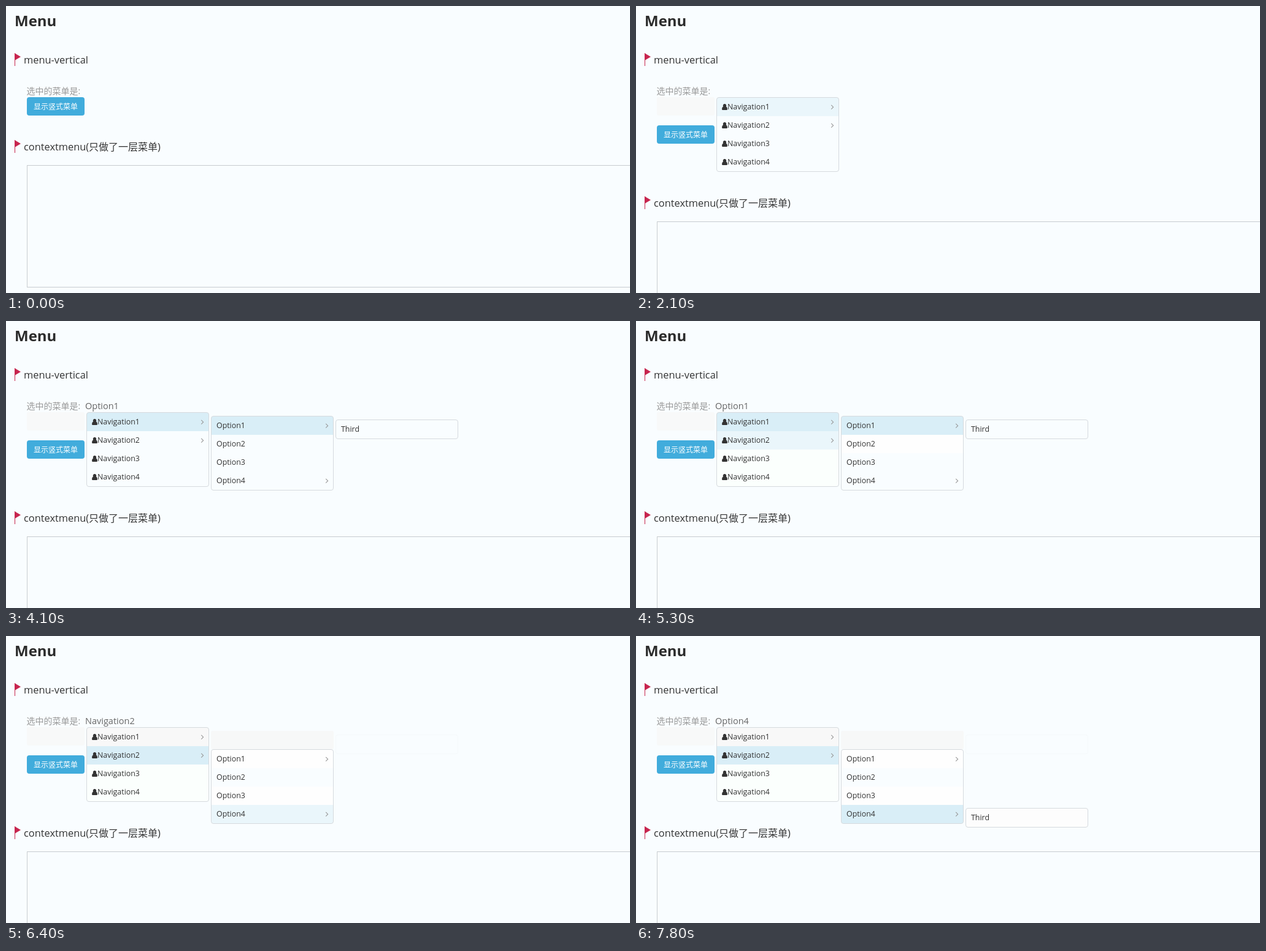
An HTML page for the animation above (8000 ms loop, 1017 px wide and 469 px high).

```html
<!DOCTYPE html>
<html lang="zh-CN">
<head>
<meta charset="utf-8">
<title>Menu</title>
<style>
html, body { margin: 0; width: 100%; height: 100%; overflow: hidden; background: #f9fdff; }
svg { display: block; font-family: "Open Sans", "Noto Sans CJK SC", "Noto Sans CJK", sans-serif; fill: #333; }
.title { font-size: 24px; font-weight: 700; fill: #2b2b2b; }
.head { font-size: 16.4px; }
.zh { font-size: 16px; }
.label { font-size: 14px; fill: #999; }
.value { font-size: 14.5px; fill: #666; }
.btn { font-size: 12px; fill: #fff; }
.item { font-size: 12.4px; }
.flag { fill: #c7254e; }
.line { fill: none; stroke: #c8cccf; }
.menu { fill: none; stroke: #d6dade; }
.arrow { fill: none; stroke: #999; stroke-width: 1.1; }
</style>
</head>
<body>
<svg width="1017" height="469" viewBox="0 0 1017 469">
  <defs>
    <g id="flag" class="flag"><path d="M0 0L10 6L0 12Z"/><rect width="1" height="21"/></g>
    <path id="user" d="M4.5 0a2.7 2.7 0 0 1 2.3 4.2Q9 5 9 8.4Q9 10 7.4 10H1.6Q0 10 0 8.4Q0 5 2.2 4.2A2.7 2.7 0 0 1 4.5 0Z"/>
    <path id="arrow" class="arrow" d="M0 0L3.4 3.4L0 6.8"/>
  </defs>
  <text class="title" x="14" y="33">Menu</text>
  <use href="#flag" x="14" y="77"/>
  <text class="head" x="29" y="94">menu-vertical</text>
  <text class="label" x="33.5" y="144">选中的菜单是:</text>
  <rect id="trace" x="34" y="149" width="94" height="30" rx="3" fill="#f8f9f9"/>
  <g id="button">
    <rect x="34" y="149" width="94" height="30" rx="4" fill="#41acdc"/>
    <text class="btn" x="45" y="168.5">显示竖式菜单</text>
  </g>
  <g id="context">
    <use href="#flag" x="14" y="219"/>
    <text class="head" x="29" y="236">contextmenu(<tspan class="zh" x="135">只做了一层菜单</tspan><tspan x="247">)</tspan></text>
    <rect class="line" x="34.5" y="260.5" width="1000" height="199"/>
  </g>
  <g id="live"></g>
</svg>
<script>
const LOOP = 8000;
const HOVER = '#eaf6fb', ACTIVE = '#d9eef7', GREY = '#f8f8f8', WHITE = '#fefefe', MINT = '#fbfffd';
const NAV = ['Navigation1', 'Navigation2', 'Navigation3', 'Navigation4'];
const OPT = ['Option1', 'Option2', 'Option3', 'Option4'];

// Each step changes only the listed keys; n*, o* and t are row fills.
const steps = [
  [0, {}],
  [1600, { open: true }],
  [1800, { n0: '#f1fafd' }],
  [2100, { n0: HOVER }],
  [2900, { n0: ACTIVE, value: NAV[0], sub: 155, arrows: [0, 3] }],
  [3300, { o0: HOVER }],
  [4100, { o0: ACTIVE, value: OPT[0], third: 161 }],
  [4800, { o1: HOVER }],
  [4900, { o1: WHITE, n3: HOVER }],
  [5100, { n3: MINT, n2: HOVER }],
  [5300, { n2: MINT, n1: HOVER }],
  [5800, { n0: GREY, n1: ACTIVE, value: NAV[1], sub: 185, third: 0, o0: WHITE, o1: '', stale: true }],
  [6300, { o2: HOVER }],
  [6400, { o2: WHITE, o3: HOVER }],
  [7000, { o3: ACTIVE, value: OPT[3], third: 281 }],
  [7600, { t0: HOVER }],
  [7800, { t0: '#fdfdfd' }]
];
let acc = {};
const states = steps.map(([at, change]) => ({ at, s: acc = { ...acc, ...change } }));

const $ = id => document.getElementById(id);

function menu(x, y, names, s, key, arrows, icons) {
  const h = names.length * 30 + 2;
  const frame = `x="${x + .5}" y="${y + .5}" width="199" height="${h - 1}" rx="3.5"`;
  const rows = names.map((name, i) => {
    const top = y + 1 + i * 30;
    return `<rect x="${x}" y="${top}" width="200" height="30" fill="${s[key + i] || '#f9fdff'}"/>`
      + (icons ? `<use href="#user" x="${x + 9}" y="${top + 10}"/>` : '')
      + `<text class="item" x="${x + (icons ? 18 : 9)}" y="${top + 19}">${name}</text>`
      + (arrows.includes(i) ? `<use href="#arrow" x="${x + 187.2}" y="${top + 11.8}"/>` : '');
  }).join('');
  return `<clipPath id="clip-${key}"><rect ${frame}/></clipPath>`
    + `<g clip-path="url(#clip-${key})">${rows}</g><rect class="menu" ${frame}/>`;
}

function draw(s) {
  $('trace').setAttribute('visibility', s.open ? 'visible' : 'hidden');
  $('button').setAttribute('transform', `translate(0 ${s.open ? 46 : 0})`);
  $('context').setAttribute('transform', `translate(0 ${s.open ? 92 : 0})`);
  let out = '';
  if (s.value) out += `<text class="value" x="129" y="144">${s.value}</text>`;
  if (s.stale) out += '<rect x="334" y="155" width="200" height="30" rx="3" fill="#f7f8f8"/>'
    + '<rect x="537.5" y="161.5" width="199" height="31" rx="3.5" fill="none" stroke="#f5f9fb"/>';
  if (s.open) out += menu(131, 149, NAV, s, 'n', [0, 1], true);
  if (s.sub) out += menu(334, s.sub, OPT, s, 'o', s.arrows);
  if (s.third) out += menu(537, s.third, ['Third'], s, 't', []);
  $('live').innerHTML = out;
}

let shown;
function tick() {
  const t = performance.now() % LOOP;
  const now = states.findLast(e => e.at <= t);
  if (now !== shown) draw((shown = now).s);
  requestAnimationFrame(tick);
}
tick();
</script>
</body>
</html>
```
